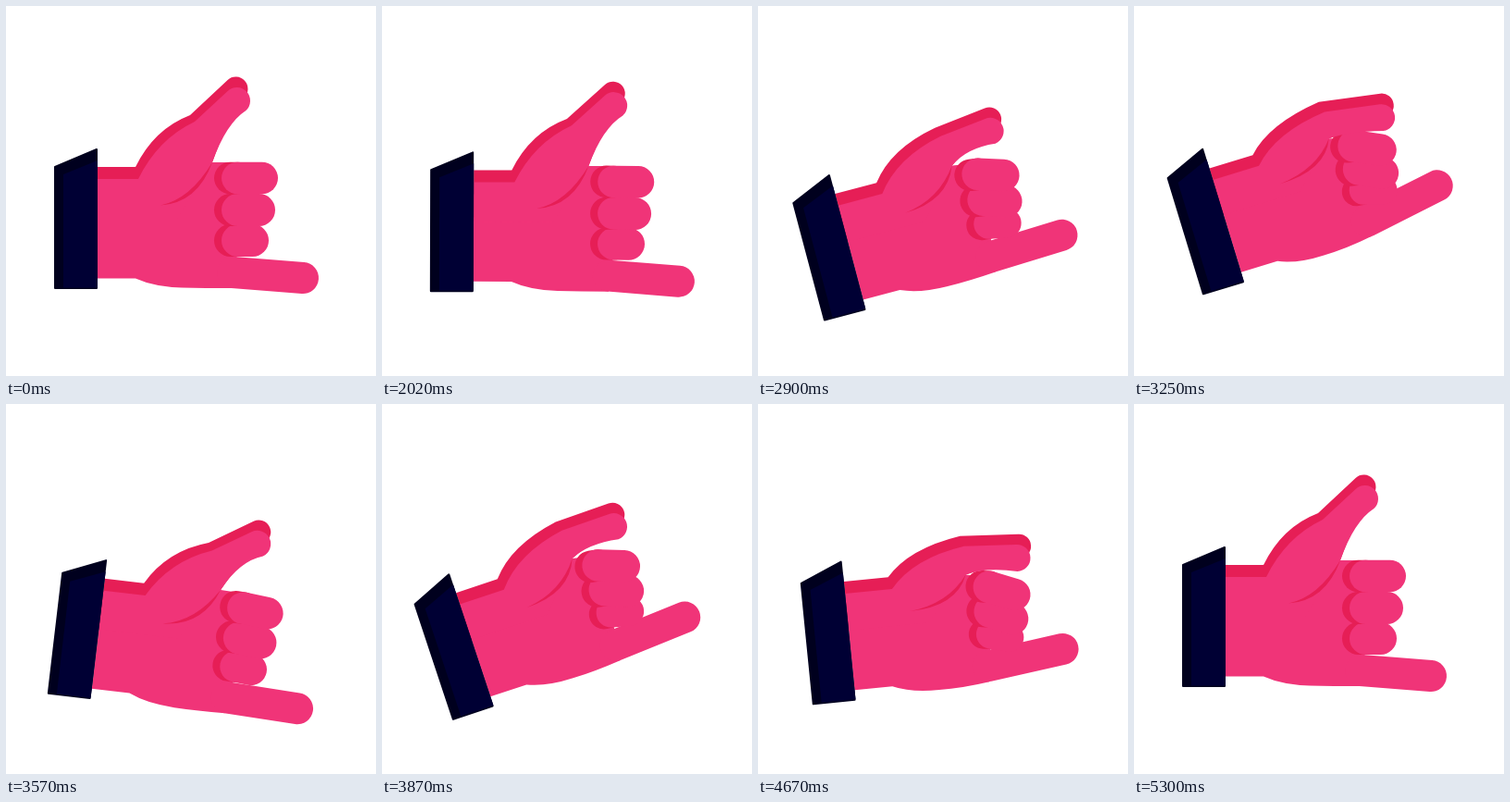
Write an HTML page with a canvas that moves like this. It is 400 px wide and 400 px high and loops after 5.32 s.

```html
<!DOCTYPE html>
<html lang="en">
<head>
<meta charset="utf-8">
<title>Shaka</title>
<style>
html, body { margin: 0; width: 100%; height: 100%; overflow: hidden; background: #fff; }
canvas { display: block; width: 400px; height: 400px; }
</style>
</head>
<body>
<canvas id="stage"></canvas>
<script>
const LOOP = 5320, HOLD = 2020, TICK = 25, LAST = 132;
const PERIOD = 20, OFFSET = 22, RELEASE = 115;
const SKIN = '#f03478', SHADE = '#e61e56', NAVY = '#000034', NIGHT = '#00001e';
const PIVOT = { x: 120, y: 240 };

const canvas = document.getElementById('stage');
const ctx = canvas.getContext('2d');
const dpr = window.devicePixelRatio || 1;
canvas.width = canvas.height = 400 * dpr;

const clamp = v => Math.max(0, Math.min(1, v));
const smooth = v => { v = clamp(v); return v * v * (3 - 2 * v); };
const mix = (a, b, k) => a + (b - a) * k;

// One shake, as [tick, value] keys of a closed curve
const KEYS = {
  drop:  [[0, 13.5], [2, 18.5], [5, 13], [8, -10.4], [9.2, -13], [13, 18], [16, 16]],
  turn:  [[0, 4.7], [1.5, 6.5], [5, -5.7], [8, -17], [10.5, -23], [13, -18.4], [17, -3]],
  thumb: [[0, .09], [5, .88], [8, 1], [13, .78], [17, .25]],
  pinky: [[0, .05], [5, .79], [8, 1], [13, .54], [17, .16]]
};

function keyAt(keys, i) {
  const n = keys.length, lap = Math.floor(i / n), k = keys[i - lap * n];
  return [k[0] + lap * PERIOD, k[1]];
}

function cycle(keys, tick) {
  const u = ((tick - OFFSET) % PERIOD + PERIOD) % PERIOD;
  let i = keys.length - 1;
  while (keys[i][0] > u) i--;
  const [a, b, c, d] = [-1, 0, 1, 2].map(j => keyAt(keys, i + j));
  const h = c[0] - b[0], k = (u - b[0]) / h;
  const m0 = (c[1] - a[1]) / (c[0] - a[0]) * h;
  const m1 = (d[1] - b[1]) / (d[0] - b[0]) * h;
  const k2 = k * k, k3 = k2 * k;
  return (2 * k3 - 3 * k2 + 1) * b[1] + (k3 - 2 * k2 + k) * m0
       + (3 * k2 - 2 * k3) * c[1] + (k3 - k2) * m1;
}

function poseAt(tick) {
  const s = Math.min(tick, RELEASE), out = tick - RELEASE;
  const lead = clamp(s / 4);
  const value = (name, gain, span) =>
    cycle(KEYS[name], s) * gain * (1 - smooth(out / span));
  return {
    drop: value('drop', lead, 7),
    turn: value('turn', smooth(s / 7), LAST - RELEASE),
    thumb: value('thumb', lead, 9),
    pinky: value('pinky', lead, 10)
  };
}

function fill(color, build) {
  ctx.fillStyle = color;
  ctx.beginPath();
  build();
  ctx.closePath();
  ctx.fill();
}

function poly(color, ...pts) {
  fill(color, () => pts.forEach(p => ctx.lineTo(p[0], p[1])));
}

function pill(color, x1, y1, x2, y2, r) {
  ctx.strokeStyle = color;
  ctx.lineWidth = 2 * r;
  ctx.lineCap = 'round';
  ctx.beginPath();
  ctx.moveTo(x1, y1);
  ctx.lineTo(x2, y2);
  ctx.stroke();
}

function finger(left, ly, right, ry, r) {
  const slope = (ry - ly) / (right - left);
  const inner = left + 8;
  pill(SHADE, left + r, ly, inner + r, ly + 8 * slope, r);
  pill(SKIN, inner + r, ly + 8 * slope, right - r, ry, r);
}

function thumbShape(color, a, ctrl, k, tip, r, dir, web, webCtrl) {
  fill(color, () => {
    ctx.moveTo(99, a[1]);
    ctx.lineTo(a[0], a[1]);
    ctx.quadraticCurveTo(ctrl[0], ctrl[1], k[0], k[1]);
    ctx.arc(tip[0], tip[1], r, dir - Math.PI / 2, dir + Math.PI / 2);
    ctx.quadraticCurveTo(webCtrl[0], webCtrl[1], web[0], web[1]);
    ctx.lineTo(185, 230);
    ctx.lineTo(99, 230);
  });
}

function drawHand(c, q) {
  const web = [223 + 9 * c, 169 + 15 * c];
  const webCtrl = [238 + 17 * c, 127 + 56 * c];
  const a = [140 + 8 * c, 174 + 3 * c];
  const ctrl = [160 + 14 * c, 133 + 17 * c];
  const k = [199 + 34 * c, 118 + 25 * c];
  const tip = [249.5 + 43.5 * c, 102.5 + 76.5 * c];
  const dir = -.75 + .92 * c;
  const baseY = 288 - 6.5 * q;

  thumbShape(SHADE, a, ctrl, k,
    [tip[0] - 1 + 5 * c, tip[1] - 13 + .5 * c], 13, dir, web, webCtrl);

  // Palm and little finger
  fill(SKIN, () => {
    ctx.moveTo(99, 200);
    ctx.lineTo(185, 205);
    ctx.lineTo(web[0], web[1]);
    ctx.lineTo(245, 169 + 19 * c);
    ctx.lineTo(250, baseY - 3);
    ctx.lineTo(245, baseY + 17);
    ctx.quadraticCurveTo(215, 305 - 1.5 * q, 190, 304.5 - 1.5 * q);
    ctx.quadraticCurveTo(160, 303.5, 140, 294.5);
    ctx.lineTo(99, 294.5);
  });
  pill(SKIN, 245, baseY, 321 + 8 * q, 294 - 27 * q, 17);

  finger(225 + 3 * c, 253.5 - 6 * c, 284 + 3 * c, 253.5 + c, 17.5 - 2 * c);
  finger(225 + 3 * c, 220.5 + 3 * c, 291 + 3 * c, 220.5 + 16 * c, 17.5);
  finger(225 + 5 * c, 186 + 12 * c, 294 + 5 * c, 186 + 26 * c, 17.3);

  thumbShape(SKIN, [a[0] + 3, a[1] + 13], [ctrl[0] + 4, ctrl[1] + 11],
    [k[0] + 5 - 2 * c, k[1] + 7 + 5 * c], tip, 14.5, dir, web, webCtrl);

  // Crease under the thumb
  fill(SHADE, () => {
    ctx.moveTo(web[0], web[1]);
    ctx.quadraticCurveTo(207 + 12 * c, 213 + 3 * c, 167, 215.5);
    ctx.quadraticCurveTo(199 + 11 * c, 209 + 3 * c, web[0], web[1]);
  });
}

function drawCuff() {
  ctx.lineJoin = 'round';
  ctx.lineWidth = 2;
  ctx.strokeStyle = NIGHT;
  poly(NIGHT, [53, 174], [98, 155], [98, 305], [53, 305]);
  ctx.stroke();
  poly(NAVY, [62, 182], [99, 167], [99, 304.5], [62, 304.5]);
}

function draw(time) {
  const t = time % LOOP;
  const tick = t < HOLD ? 0 : Math.min(LAST, Math.floor((t - HOLD) / TICK) + 1);
  const pose = poseAt(tick);
  ctx.setTransform(dpr, 0, 0, dpr, 0, 0);
  ctx.fillStyle = '#fff';
  ctx.fillRect(0, 0, 400, 400);
  ctx.translate(PIVOT.x, PIVOT.y + pose.drop);
  ctx.rotate(pose.turn * Math.PI / 180);
  ctx.translate(-PIVOT.x, -PIVOT.y);
  drawHand(pose.thumb, pose.pinky);
  drawCuff();
}

const start = performance.now();
function loop() {
  draw(performance.now() - start);
  requestAnimationFrame(loop);
}
loop();
</script>
</body>
</html>
```
